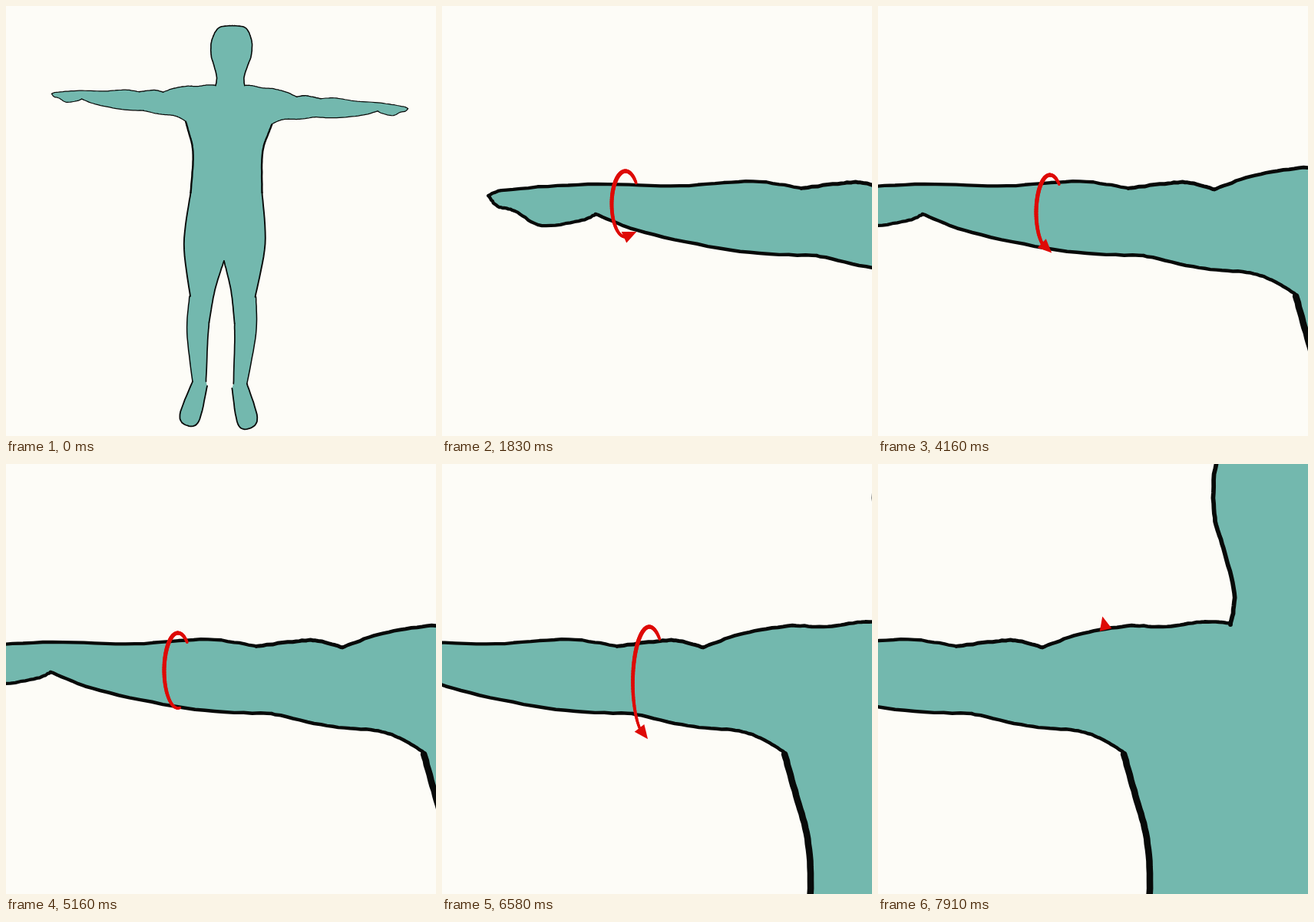
Write an HTML page with a canvas that moves like this. It is 560x560 px and loops after 8 s.

```html
<!DOCTYPE html>
<html lang="en">
<head>
<meta charset="utf-8">
<title>Arm turns</title>
<style>
  html, body { margin: 0; width: 100%; height: 100%; overflow: hidden; background: #fdfcf7; }
  canvas { display: block; width: 560px; height: 560px; }
</style>
</head>
<body>
<canvas id="stage" width="560" height="560"></canvas>
<script>
const ctx = document.getElementById('stage').getContext('2d');
const PAPER = '#fdfcf7', SKIN = '#73b8ae', INK = '#080a09', RED = '#de0a06';
const LOOP = 8000, FPS = 12, ZOOM = 3.58, TOP = 162.5;

const lerp = (a, b, k) => a + (b - a) * k;
const clamp = v => Math.max(0, Math.min(1, v));

let seed = 7;
const rough = () => ((seed = seed * 16807 % 2147483647) / 2147483647 - 0.5) * 0.26;

// Catmull-Rom curve through key points, slightly roughened like ink
function spline(p, n = 9) {
  const out = [p[0]], last = p.length - 1;
  for (let i = 0; i < last; i++) {
    const a = p[Math.max(0, i - 1)], b = p[i], c = p[i + 1], d = p[Math.min(last, i + 2)];
    for (let j = 1; j <= n; j++) {
      const t = j / n;
      out.push([0, 1].map(k => 0.5 * (2 * b[k] + (c[k] - a[k]) * t
        + (2 * a[k] - 5 * b[k] + 4 * c[k] - d[k]) * t * t
        + (3 * b[k] - a[k] - 3 * c[k] + d[k]) * t * t * t) + (j < n ? rough() : 0)));
    }
  }
  return out;
}

const edge = (w, ...pts) => ({ w, pts });

// One half of the figure, from crown to crotch
const half = [
  // head and shoulder
  edge(1.6, [294.6, 25.5], [277, 28.5], [267.9, 45], [267.1, 63.5], [269.9, 74.4], [274.4, 92.3], [273, 103.8]),
  edge(1.3, [273, 103.2], [262.1, 102.9], [248.4, 104.6], [235.3, 104.3], [217.7, 107.4], [204.6, 112.1]),
  // arm and hand
  edge(1.4, [204.6, 112.1], [194.8, 109.6], [187.8, 109.9], [173.3, 111.7]),
  edge(1.2, [173.3, 111.7], [155.7, 109.2], [129.1, 110.8], [95.6, 110.2], [66, 112.3], [59.4, 114.4]),
  edge(1.2, [59.4, 114.4], [62.7, 118.2], [69.1, 120], [78.9, 125.3], [93.4, 123.3], [98.4, 121.1]),
  edge(1.25, [98.4, 121.1], [116.5, 127.8], [151, 134.7], [178.9, 136.2]),
  edge(1.25, [178.9, 136.2], [199, 140.6], [216.3, 142.3], [225.5, 145.1], [233.9, 150.1]),
  // torso
  edge(2.4, [234.2, 151], [238.4, 166], [242.6, 181.7], [243.5, 203], [240.5, 243]),
  // leg and foot
  edge(1.9, [240.5, 243], [231.8, 310], [240, 378]),
  edge(1.5, [239, 378], [235.7, 425], [243, 489]),
  edge(1.8, [243, 489], [226.5, 532], [235, 546], [251, 541], [262, 495]),
  edge(1.7, [260.5, 489], [262.5, 440], [264.5, 412]),
  edge(1.8, [264.5, 412], [272, 370], [283.9, 332])
];

// The other half is a mirror image: the figure leans and its arm hangs lower
function mirror([x, y]) {
  const hang = Math.max(0, 273 - x) * 0.09 * clamp((190 - y) / 40);
  const reach = Math.max(0, y - 332) * 0.018;
  return [584 - 0.07 * (y - 100) - x, y + hang + reach];
}

const left = half.map(e => edge(e.w, ...spline(e.pts)));
const right = left.map(e => edge(e.w, ...e.pts.map(mirror).reverse())).reverse();
const body = [...left, ...right];

const shape = new Path2D();
for (const e of body) {
  e.path = new Path2D();
  for (const [x, y] of e.pts) {
    e.path.lineTo(x, y);
    shape.lineTo(x, y);
  }
}

// Camera moves: first step and the x offset it arrives at
const moves = [[6, 152.3], [37, 294.3], [64, 392.3], [91, 518.3]];

function camera(n) {
  let scale = 1, x = 0, y = 0;
  for (const [at, to] of moves) {
    const k = clamp((n - at + 1) / 3);
    scale = lerp(scale, ZOOM, k);
    x = lerp(x, -to, k);
    y = lerp(y, -TOP, k);
  }
  return [scale, x, y];
}

// Each arrow runs along an ellipse around the arm, over the top and down the front
const arrows = [
  { start: 11, snap: 31, end: 37, cx: 239, cy: 258, rx: 18, ry: 43, from: -0.7, to: -4.65 },
  { start: 41, snap: 58, end: 64, cx: 224, cy: 269, rx: 18, ry: 49, from: -0.85, to: -4.85 },
  { start: 68, snap: 85, end: 91, cx: 270, cy: 285, rx: 21.5, ry: 73, from: -0.9, to: -4.1 },
  { start: 95, snap: 112, end: 118, cx: 285.6, cy: 266.5, rx: 14, ry: 80, from: -0.7, to: -4.1 }
];

const onRing = (a, turn) => [a.cx + a.rx * Math.cos(turn), a.cy + a.ry * Math.sin(turn)];

function drawHead(a, s) {
  const turn = lerp(a.from, a.to, s);
  const [x, y] = onRing(a, turn), [tx, ty] = onRing(a, turn - 0.5);
  ctx.save();
  ctx.translate(x, y);
  ctx.rotate(Math.atan2(ty - y, tx - x));
  ctx.beginPath();
  ctx.moveTo(17, 0);
  ctx.lineTo(-1, 8);
  ctx.lineTo(-1, -8);
  ctx.fill();
  ctx.restore();
}

function drawTrail(a, s) {
  const steps = Math.ceil(60 * s);
  let from = onRing(a, a.from);
  for (let i = 1; i <= steps; i++) {
    const k = Math.min(i / 60, s), to = onRing(a, lerp(a.from, a.to, k));
    ctx.lineWidth = 3.4 + 1.9 * Math.sin(Math.PI * Math.pow(k, 0.75));
    ctx.beginPath();
    ctx.moveTo(...from);
    ctx.lineTo(...to);
    ctx.stroke();
    from = to;
  }
}

function drawSnap(step) {
  const reach = 24 + 11.5 * Math.min(step, 2);
  ctx.lineWidth = 4;
  for (const turn of [-0.68, 0, 0.68]) {
    const dx = Math.sin(turn), dy = -Math.cos(turn);
    ctx.beginPath();
    ctx.moveTo(261.5 + dx * 12, 230 + dy * 12);
    ctx.lineTo(261.5 + dx * reach, 230 + dy * reach);
    ctx.stroke();
  }
}

// First lap draws the trail, a quicker second lap moves only the head
function drawArrow(a, n) {
  if (n < a.start || n >= a.end) return;
  const i = n - a.start, lap = a.snap - a.start - 14;
  drawTrail(a, clamp(i / 11));
  if (i < 12) drawHead(a, i / 11);
  else if (i > 12 && i < 13 + lap) drawHead(a, (i - 13) / (lap - 1));
  if (n >= a.snap && n < a.snap + 4) drawSnap(n - a.snap);
}

function render(ms) {
  const n = Math.floor((ms % LOOP + 7) * FPS / 1000);
  const [scale, x, y] = camera(n);
  ctx.setTransform(1, 0, 0, 1, 0, 0);
  ctx.fillStyle = PAPER;
  ctx.fillRect(0, 0, 560, 560);
  ctx.lineCap = ctx.lineJoin = 'round';

  ctx.setTransform(scale, 0, 0, scale, x, y);
  ctx.fillStyle = SKIN;
  ctx.fill(shape);
  ctx.strokeStyle = INK;
  for (const e of body) {
    ctx.lineWidth = e.w;
    ctx.stroke(e.path);
  }

  ctx.setTransform(1, 0, 0, 1, 0, 0);
  ctx.fillStyle = ctx.strokeStyle = RED;
  for (const a of arrows) drawArrow(a, n);
}

const begin = performance.now();
function tick() {
  render(performance.now() - begin);
  requestAnimationFrame(tick);
}
tick();
</script>
</body>
</html>
```
